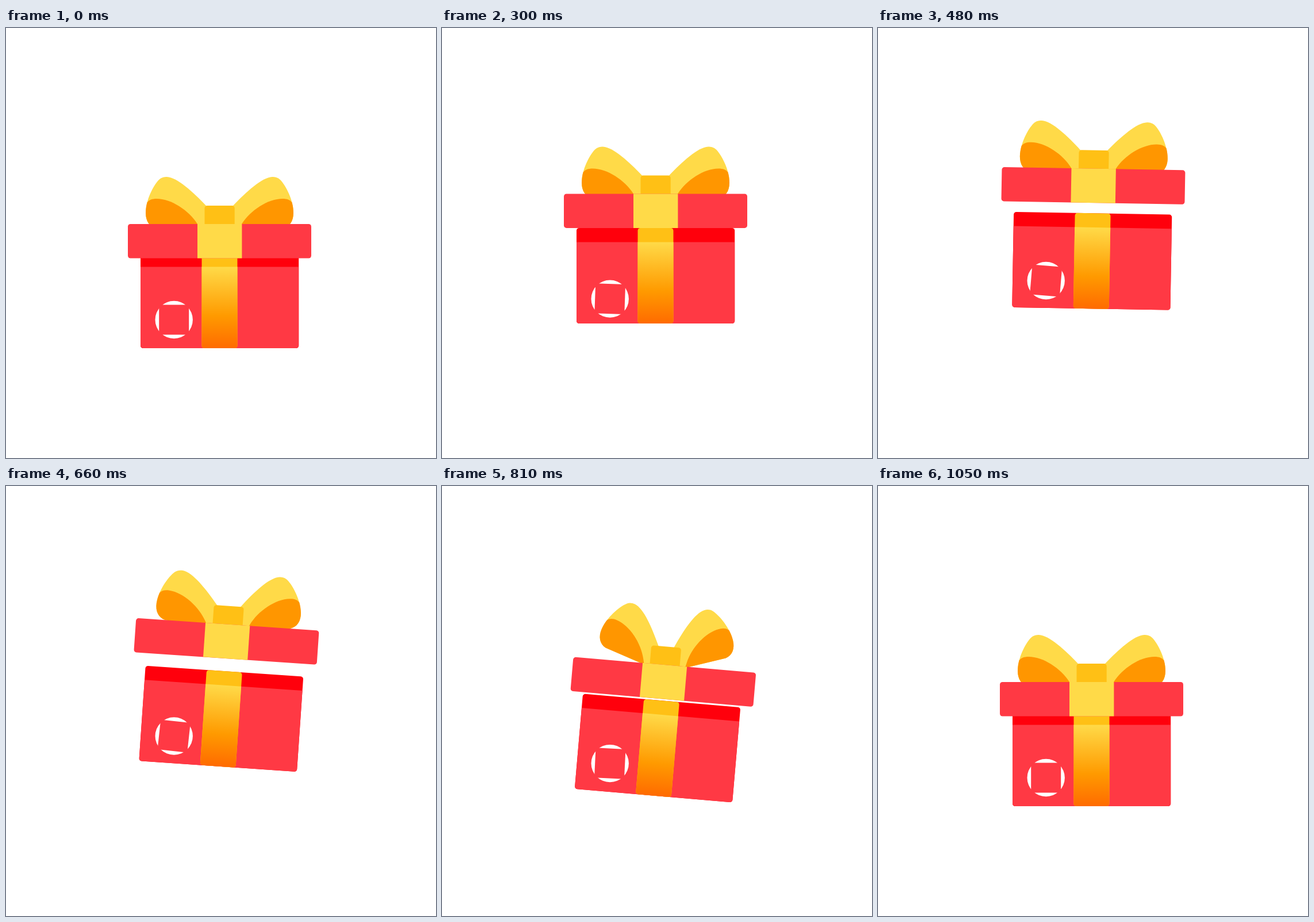
An HTML page with a canvas that plays this animation: 748 by 748 pixels, repeating every 2.99 s.

```html
<!DOCTYPE html>
<html lang="en">
<head>
<meta charset="utf-8">
<title>Gift box</title>
<style>
  html, body { margin: 0; width: 100%; height: 100%; overflow: hidden; background: #fff; }
  canvas { display: block; width: 100vmin; height: 100vmin; }
</style>
</head>
<body>
<canvas id="stage" width="748" height="748"></canvas>
<script>
const ctx = document.getElementById('stage').getContext('2d');
const LOOP = 2990, STEP = 30;
const RED = '#ff3944', DARK = '#ff000c', YELLOW = '#ffda48', ORANGE = '#ff9600', AMBER = '#ffc015';
const MID = 371.5, PIVOT_Y = 514, LID_TOP = 341;
const BODY = { x: 234, y: 391, w: 275.2, h: 166, band: 24.6 };

const rad = deg => deg * Math.PI / 180;
const progress = (t, a, b) => Math.min(1, Math.max(0, (t - a) / (b - a)));
const smooth = p => p * p * (3 - 2 * p);

// Cubic ease with handles (a, 0) and (b, 1), solved by bisection.
function ease(p, a, b) {
  let lo = 0, hi = 1;
  for (let i = 0; i < 24; i++) {
    const s = (lo + hi) / 2, r = 1 - s;
    const x = 3 * a * s * r * r + 3 * b * s * s * r + s * s * s;
    if (x < p) lo = s; else hi = s;
  }
  return smooth(lo);
}

const rise = (t, a, b) => smooth(progress(t, a, b));
const fall = (t, a, b) => 1 - rise(t, a, b);

function pose(t) {
  return {
    lift: 72 * ease(progress(t, 90, 600), 0.33, 0.3) * fall(t, 628, 899),
    gap: 32 * rise(t, 140, 582) * fall(t, 641, 934),
    tilt: 5 * rise(t, 355, 791) * fall(t, 791, 1050),
    flap: 19 * rise(t, 571, 837) * fall(t, 837, 1050),
    badgeLift: 73 * ease(progress(t, 60, 600), 0.38, 0.475) * fall(t, 646, 916),
    badgeTurn: 6.2 * rise(t, 80, 660) * fall(t, 650, 950)
  };
}

function box(x, y, w, h, radii, fill) {
  ctx.fillStyle = fill;
  ctx.beginPath();
  ctx.roundRect(x, y, w, h, radii);
  ctx.fill();
}

const wing = new Path2D(
  'M263 349C250 347 243 336 243 322C243 300 256 274 266 264' +
  'C270 260 275 259 280 259C298 260 325 285 348 309L362 325V349Z');
const wingShade = new Path2D(
  'M263 349C250 347 243 336 243 322C243 315 244 309 245.5 303.5' +
  'C249 299 254 297 262 297C287 297 318 317 333 341L338 349Z');

function drawWing(side, flap) {
  ctx.save();
  ctx.translate(MID, 0);
  ctx.scale(side, 1);
  ctx.translate(-17, 337.75);
  ctx.rotate(rad(flap));
  ctx.scale(1 - 0.03 * flap / 19, 1);
  ctx.translate(17 - MID, -337.75);
  ctx.fillStyle = YELLOW;
  ctx.fill(wing);
  ctx.fillStyle = ORANGE;
  ctx.fill(wingShade);
  ctx.restore();
}

function drawBody() {
  const { x, y, w, h, band } = BODY;
  box(x, y, w, h, 4.5, DARK);
  box(x, y + band, w, h - band, [0, 0, 4.5, 4.5], RED);
  box(340.5, y, 62, h, 4.5, AMBER);
  const shade = ctx.createLinearGradient(0, y + band, 0, y + h);
  shade.addColorStop(0, '#ffda48');
  shade.addColorStop(0.6, '#ff9a00');
  shade.addColorStop(1, '#ff6b00');
  box(340.5, y + band, 62, h - band, [0, 0, 4.5, 4.5], shade);
}

function drawLid(gap, flap) {
  ctx.save();
  ctx.translate(0, -gap);
  drawWing(1, flap);
  drawWing(-1, flap);
  box(345.5, 309, 52.2, 34, [4.5, 4.5, 0, 0], AMBER);
  box(212, LID_TOP, 319, 59.5, 4.5, RED);
  box(333, LID_TOP, 77.4, 59.5, 0, YELLOW);
  ctx.restore();
}

function drawBadge(lift, turn) {
  ctx.save();
  ctx.translate(292.2, 507.5 - lift);
  ctx.fillStyle = '#fff';
  ctx.beginPath();
  ctx.arc(0, 0, 32.7, 0, Math.PI * 2);
  ctx.fill();
  ctx.rotate(rad(turn));
  box(-26, -26, 52, 52, 0, RED);
  ctx.restore();
}

function draw(t) {
  const p = pose(t);
  ctx.fillStyle = '#fff';
  ctx.fillRect(0, 0, 748, 748);
  ctx.save();
  ctx.translate(MID, PIVOT_Y - p.lift);
  ctx.rotate(rad(p.tilt));
  ctx.translate(-MID, -PIVOT_Y);
  drawBody();
  drawLid(p.gap, p.flap);
  ctx.restore();
  drawBadge(p.badgeLift, p.badgeTurn);
}

const start = performance.now();
function tick() {
  const t = (performance.now() - start) % LOOP;
  draw(Math.floor(t / STEP) * STEP);
  requestAnimationFrame(tick);
}
tick();
</script>
</body>
</html>
```
